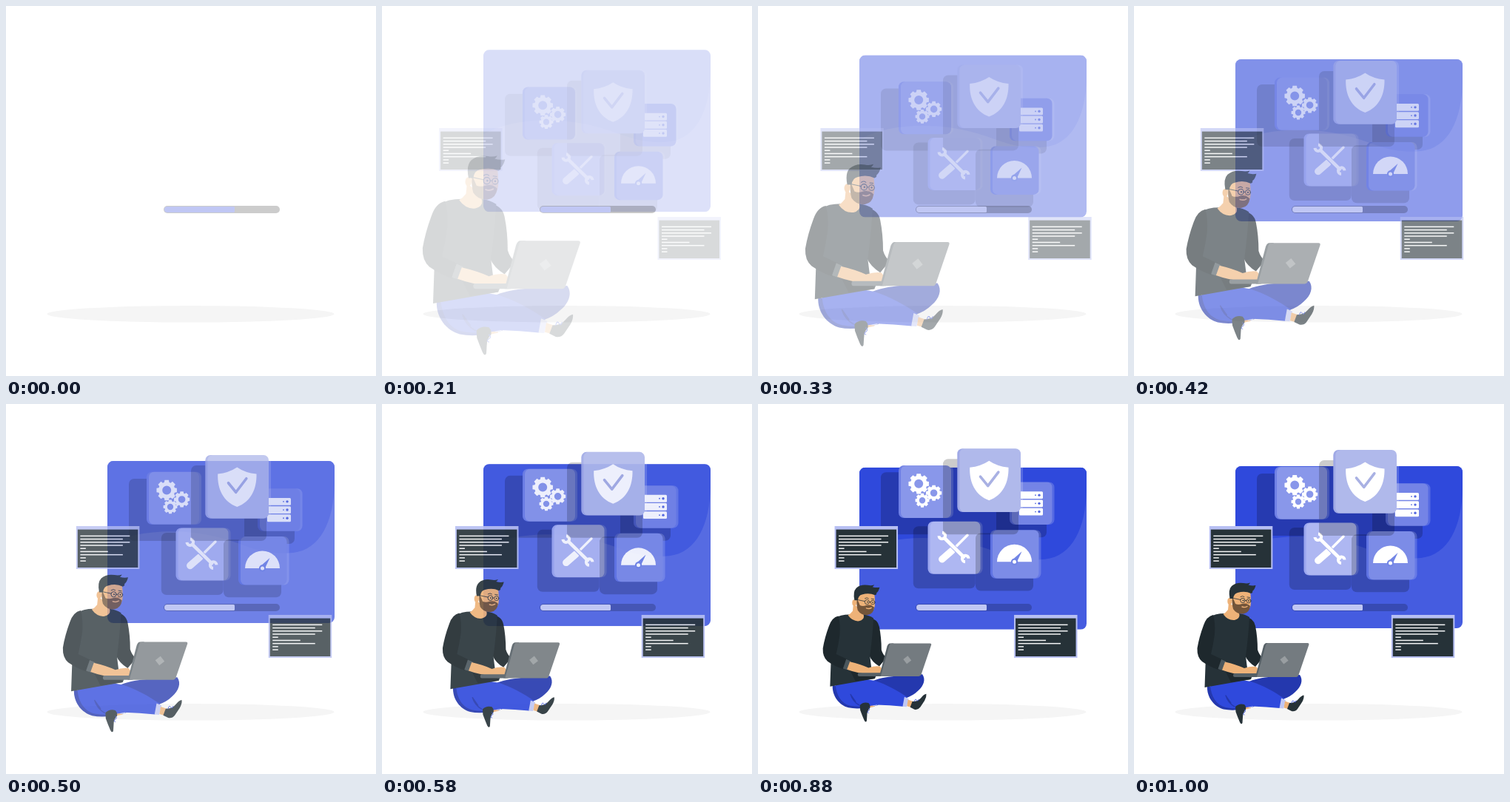
Write an HTML page that moves like this. It is 500x500 px and loops after 1040 ms.

```html
<!DOCTYPE html>
<html lang="en">
<head>
<meta charset="utf-8">
<title>System maintenance</title>
<style>
  html, body { margin: 0; width: 100%; height: 100%; overflow: hidden; background: #fff; }
  svg { display: block; width: 100%; height: 100%; --p: 0; --rest: calc(1 - var(--p)); }
  .in { opacity: var(--p); }
  .down { transform: translateY(calc(var(--rest) * -30px)); }
  .up { transform: translateY(calc(var(--rest) * 30px)); }
  .right { transform: translateX(calc(var(--rest) * -30px)); }
  .left { transform: translateX(calc(var(--rest) * 30px)); }
  .zoom { transform-origin: 160px 337px; transform: scale(calc(1 + var(--rest) * .5)); }
  .main { fill: #2f49dc; }
  .pale { fill: #c0c7f4; }
  .dark { fill: #263238; }
  .deep { fill: #1e282d; }
  .skin { fill: #eeb278; }
  .line { fill: none; stroke-linecap: round; stroke-linejoin: round; }
</style>
</head>
<body>
<svg id="stage" viewBox="0 0 500 500">
  <defs>
    <clipPath id="screen"><rect x="137" y="84" width="307" height="219" rx="8"/></clipPath>
    <g id="terminal">
      <rect width="85.5" height="58" fill="#b7bff3"/>
      <rect class="dark" x="2" y="4.6" width="81.5" height="51.4"/>
    </g>
  </defs>

  <ellipse cx="249.5" cy="416.3" rx="194" ry="11.3" fill="#f5f5f5"/>

  <g class="in down">
    <g clip-path="url(#screen)">
      <rect x="137" y="84" width="307" height="219" fill="#455ce0"/>
      <path class="main" d="M137 84H444V115C443 165 425 204 388 208C345 212 325 197 290 188C240 174 175 176 137 198Z"/>
    </g>
  </g>

  <g class="in up" id="tiles"></g>

  <rect x="213" y="270" width="157" height="10" rx="5" opacity=".2"/>
  <path class="pale" d="M218 271H307.5Q309 271 309 272.5V277.5Q309 279 307.5 279H218A4 4 0 0 1 218 271Z"/>

  <g class="in right"><g class="term" transform="translate(101.8 165)"></g></g>
  <g class="in left"><g class="term" transform="translate(347.8 285)"></g></g>

  <g class="in zoom">
    <!-- legs -->
    <path fill="#2438ae" d="M150 378C165 368 195 368 224 366C229 373 226 382 218 389Q211 396 201 399Z"/>
    <path fill="#2438ae" d="M99 381C98 396 108 409 121 412.5Q138 416 162 409L170 395Z"/>
    <path class="skin" d="M148 405L156 407L158 411L149 413Z"/>
    <path class="pale" d="M154 404.500L162 406.500L161 409.500L155 410.500Z"/>
    <path class="main" d="M103 380C104 395 111 407 124 410Q140 413 160 408.500Q178 409 197 411L203 398C190 389 174 380 158 375L135 371Z"/>
    <path class="line" stroke="#2438ae" stroke-width="1.3" d="M124 394Q127 404 136 409M124 394L131 404"/>
    <path class="pale" d="M199 397.500L205 400L202 411.500L196.500 411Z"/>
    <path class="skin" d="M204 401.500L211 404L208 412L202.500 410.500Z"/>
    <!-- shoes -->
    <path class="dark" d="M210 404Q218 404 222 399Q226 394 229.500 393.500Q230 398 227 403L221 412Q218 416 213 415L207 412Z"/>
    <path class="line" stroke="#2f49dc" stroke-width=".8" d="M213 404Q214 399 216 402T219 401"/>
    <path class="dark" d="M137 409Q142 404 149 406Q152 409 151 413Q147 417 147 423L146.500 431Q145 434 143 430Q140 423 137.500 416Z"/>
    <path class="line" stroke="#2f49dc" stroke-width=".8" d="M149 413Q152 415 149 417T149 420"/>
    <!-- far sleeve -->
    <path class="deep" d="M149 287Q162 289 164 300Q167 315 167 332Q169 339 174 343L164 355Q154 349 150 340Z"/>
    <!-- torso -->
    <path class="dark" d="M123 283Q109 283 103 288L97 340L95.500 383L158 372L160 367L153 357L151 341Q155 310 156 288Q150 284 142 283Z"/>
    <path class="deep" d="M124 362L156 368L158 372L131 376Z"/>
    <!-- neck -->
    <path class="skin" d="M128 268L127 278Q124 282 120.500 284Q127 293 136 292Q143 290 142.500 285L141 278Z"/>
    <!-- near sleeve -->
    <path class="deep" d="M107 285Q98 287 94 299Q88 315 85.500 330Q85 342 92 348Q102 355 114 359L121 346L104 338Q107 325 109 311Q110 295 107 285Z"/>
    <path fill="#4b575d" d="M118 345L124.500 348L119.500 360L113.500 358Z"/>
    <path class="skin" d="M123 348.500Q138 352 149 357Q158 354 165 355L169 360L165 366H150Q134 365 119 359.500Z"/>
    <!-- head -->
    <path class="skin" d="M130 254Q143 250 157 252Q158 260 158 268Q158 278 150 281Q140 285 134 276Z"/>
    <ellipse class="skin" cx="129.300" cy="266.500" rx="3" ry="4.500"/>
    <path fill="#73553a" d="M133 261Q136 267 137 270Q141 272 146 270Q152 268 157 273Q156 282 148 283.500Q139 284.500 134 277Q132 270 133 261Z"/>
    <path class="line" stroke="#eeb278" stroke-width="1.400" d="M146 274Q150 275.500 153 273.500"/>
    <path class="dark" d="M129.500 263Q127 251 132 246Q138 240.500 148 242Q153 243 157 241.500Q156 243.500 154.500 244.500Q160 246 164.500 245Q163 251 160 253Q161 255 158 256Q150 252 140 255Q135 256 134 263Z"/>
    <g class="line" stroke="#263238" stroke-width=".8">
      <circle cx="147" cy="265.500" r="3.200"/><circle cx="155" cy="266" r="2.900"/>
      <path d="M143.800 264.500L132 262M150.200 265.500L152 265.700M144 260.500Q147 258.500 149 260.500M153 261L156.500 261.500"/>
      <path stroke="#cf8a52" d="M151.500 266L153 269.500L150.500 269.500"/>
    </g>
    <circle class="dark" cx="147.500" cy="265.500" r=".9"/><circle class="dark" cx="155" cy="266" r=".9"/>
    <!-- laptop -->
    <path fill="#566066" d="M136 364H168V369H136Q134 369 134 366.500Q134 364 136 364Z"/>
    <path fill="#566066" d="M179 323H184L170 369H164L175 327Q176.500 323 179 323Z"/>
    <path fill="#747b80" d="M181 323H234.500Q237 323 236.300 325.500L222.500 366Q221.500 369 219 369H166L178 326Q179 323 181 323Z"/>
    <rect x="-4" y="-4" width="8" height="8" fill="#999ea1" transform="translate(203 346) rotate(-38)"/>
  </g>
</svg>
<script>
const stage = document.getElementById('stage');

function gear(cx, cy, r, hole) {
  const teeth = 8, step = 2 * Math.PI / teeth;
  const at = (rad, a) => (cx + rad * Math.cos(a)).toFixed(2) + ' ' + (cy + rad * Math.sin(a)).toFixed(2);
  const pts = [];
  for (let i = 0; i < teeth; i++) {
    const a = i * step;
    pts.push(at(r * .8, a - .3), at(r, a - .2), at(r, a + .2), at(r * .8, a + .3));
  }
  const ring = `M${cx - hole} ${cy}a${hole} ${hole} 0 1 0 ${2 * hole} 0a${hole} ${hole} 0 1 0 ${-2 * hole} 0Z`;
  return `<path fill="#fff" fill-rule="evenodd" d="M${pts.join('L')}Z${ring}"/>`;
}

// A tinted card with a glass layer shifted to the right and a larger shadow.
function tile(x, y, size, color, sx, sy, shadow, icon) {
  const box = (bx, by, s, rest) => `<rect x="${bx}" y="${by}" width="${s}" height="${s}" rx="7" ${rest}/>`;
  return box(sx, sy, shadow, 'opacity=".2"') + box(x, y, size, `fill="${color}"`) +
    box(x + 3, y, size, 'fill="#fff" opacity=".18"') + icon;
}

const gears = gear(217.2, 109.6, 14, 6) + gear(237.6, 122, 10.8, 4.8) + gear(222, 132, 9.6, 4.2);

const servers = [120, 131.2, 142.4].map(y =>
  `<rect x="353" y="${y}" width="32" height="9.8" rx="1.5" fill="#fff"/>
   <circle cx="375" cy="${y + 4.9}" r=".9" fill="#5569e0"/><circle cx="380" cy="${y + 4.9}" r="1.7" fill="#5569e0"/>`).join('');

const tools = `<g class="line" stroke="#fff">
  <path stroke-width="3.4" d="M283 179L265 197"/>
  <path stroke-width="9.5" d="M262 200L248.800 211.500"/>
  <path stroke="#adb7f2" stroke-width="6.500" d="M253 184L277 208"/>
  <path stroke-width="4.600" d="M252 183L278 208.500"/>
  <path stroke-width="4" stroke-linecap="butt" d="M249 175.500A4.300 4.300 0 1 1 244.500 180M280 215A4.300 4.300 0 1 1 284.500 210.500"/>
</g>`;

const gauge = `<path fill="#fff" d="M323 215A23.500 23.500 0 0 1 370 215Z"/>
  <path fill="#7285e5" d="M343.500 212.500L356.500 201L349.500 216Z"/>
  <circle cx="346.500" cy="215" r="4.600" fill="#7285e5"/><circle cx="346.500" cy="215" r="2.500" fill="#fff"/>`;

const shield = `<path fill="#fff" d="M312.300 78.500Q323 86 338.500 87.500C339 108 331 125 312.300 132C293.500 125 285.500 108 286.200 87.500Q301 86 312.300 78.500Z"/>
  <path class="line" stroke="#a9b1e3" stroke-width="3.600" d="M300.500 99.800L310.700 112.300L324.800 93.800"/>`;

document.getElementById('tiles').innerHTML =
  tile(340, 107.3, 57.5, '#5569e0', 322, 114, 68, servers) +
  tile(190, 84.8, 71, '#6f80e5', 166, 94, 84, gears) +
  tile(229.5, 160.5, 71, '#9ca7ef', 209.8, 167, 84, tools) +
  tile(314, 172, 65.5, '#5f73e2', 294, 176.3, 78, gauge) +
  tile(269.3, 62, 85.7, '#9fa9e6', 250, 76, 102, shield);

const widths = [67, 57.5, 67, 57.5, 7.5, 37.5, 57.5, 7.5, 7.5];
const code = widths.map((w, i) =>
  `<rect x="5.500" y="${12.6 + i * 4.22}" width="${w}" height="1.500" fill="#f3f4f5"/>`).join('');
for (const g of document.querySelectorAll('.term')) g.innerHTML = '<use href="#terminal"/>' + code;

// cubic-bezier(.36, -.01, .5, 1.38): settles after an overshoot
function ease(x) {
  if (x <= 0 || x >= 1) return x <= 0 ? 0 : 1;
  const curve = (s, a, b) => 3 * (1 - s) * (1 - s) * s * a + 3 * (1 - s) * s * s * b + s * s * s;
  let lo = 0, hi = 1;
  for (let i = 0; i < 30; i++) {
    const mid = (lo + hi) / 2;
    if (curve(mid, .36, .5) < x) lo = mid; else hi = mid;
  }
  return curve(lo, -.01, 1.38);
}

const LOOP = 1040, FPS = 24, LEAD = .013;
const start = performance.now();

function draw() {
  const ms = (performance.now() - start) % LOOP;
  const step = Math.floor((ms + 4) * FPS / 1000);
  stage.style.setProperty('--p', step < 2 ? 0 : ease(step / FPS + LEAD).toFixed(4));
  requestAnimationFrame(draw);
}
draw();
</script>
</body>
</html>
```
